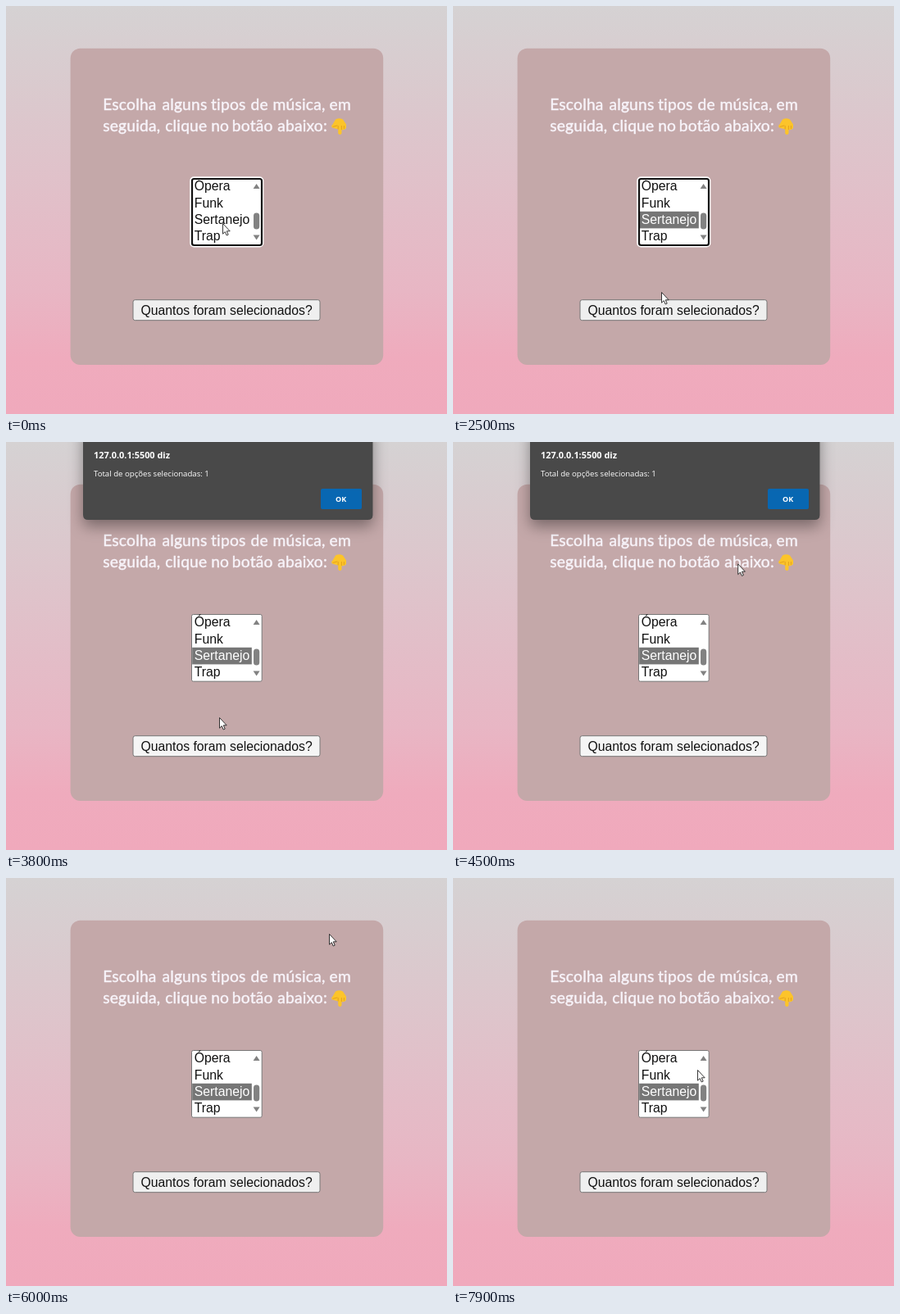
These frames come from a looping animation (538x498 px, 8000 ms). An HTML page:

```html
<!DOCTYPE html>
<html lang="pt-BR">
<head>
<meta charset="utf-8">
<title>Tipos de música</title>
<style>
  html, body { margin: 0; width: 100%; height: 100%; overflow: hidden; }
  svg { display: block; width: 100vw; height: 100vh; }
  .heading { font: 19.2px "Comic Sans MS", Lato, sans-serif; letter-spacing: .22px; fill: #f8f4fa; stroke: #f8f4fa; stroke-width: .45px; }
  .form { font: 15.75px "Liberation Sans", Arial, sans-serif; fill: #111; }
  .alert { font: 9.65px "Open Sans", sans-serif; fill: #fff; }
  .alert .title { font-size: 10.9px; font-weight: 700; }
  .alert .ok { font-size: 9px; font-weight: 700; text-anchor: middle; }
</style>
</head>
<body>
<svg viewBox="0 0 538 498">
  <defs>
    <linearGradient id="sky" x2="0" y2="1">
      <stop offset="0" stop-color="#d5d2d3"/>
      <stop offset=".2" stop-color="#dacace"/>
      <stop offset=".7" stop-color="#e8b6c4"/>
      <stop offset=".86" stop-color="#efabbd"/>
      <stop offset="1" stop-color="#f0a9bc"/>
    </linearGradient>
    <filter id="shadow" x="-20%" y="-30%" width="140%" height="190%">
      <feDropShadow dx="0" dy="8" stdDeviation="9" flood-opacity=".38"/>
    </filter>
  </defs>
  <rect width="538" height="498" fill="url(#sky)"/>
  <rect x="78.6" y="51.8" width="381.6" height="386.2" rx="12" fill="#c4a8a9"/>

  <text class="heading" y="127"><tspan x="118.2">Escolha </tspan><tspan x="190.4">alguns </tspan><tspan x="250">tipos </tspan><tspan x="298.6">de </tspan><tspan x="325.6">música, </tspan><tspan x="394.6">em</tspan></text>
  <text class="heading" y="153"><tspan x="118.2">seguida, </tspan><tspan x="194.2">clique </tspan><tspan x="250.2">no </tspan><tspan x="275.8">botão </tspan><tspan x="331.2">abaixo:</tspan></text>

  <g stroke-linecap="round" fill="none">
    <path d="M402 138.5Q406.5 136 411 138.5L415 144.5V149Q412.5 152 409.5 151V155.5Q407.4 158.5 405.2 155.5V150.5L398 148.5Q396 146.5 398.5 144.5Z" fill="#fcc42a"/>
    <path d="M405.2 150V146.5M409.4 150.5V146.5M412.4 149.5V146.5M399 147.3L404 146" stroke="#dc981c" stroke-width=".8"/>
  </g>

  <g class="form">
    <rect x="226.5" y="210.5" width="85.7" height="81.7" rx="2" fill="#fff" stroke="#767676"/>
    <rect id="pick" x="227.2" y="250.8" width="72.6" height="20.6" fill="#767676"/>
    <g id="rows"/>
    <rect x="302" y="252.6" width="7.2" height="20" rx="3.6" fill="#828282"/>
    <path d="M301.6 223L305.6 217L309.6 223ZM301.6 279.5H309.6L305.6 285.5Z" fill="#828282"/>
    <g id="ring" fill="none" stroke-width="2">
      <rect x="225.2" y="209.2" width="88.2" height="84.3" rx="4" stroke="#fff"/>
      <rect x="227" y="211" width="85" height="81" rx="2.5" stroke="#111" stroke-width="2.2"/>
    </g>
  </g>

  <g class="form">
    <rect id="button" x="155" y="358.7" width="228" height="25" rx="2.5" stroke="#767676"/>
    <text x="164.5" y="377">Quantos foram selecionados?</text>
  </g>

  <g id="alert" class="alert">
    <path d="M94 -20H447.5V89Q447.5 95 441.5 95H100Q94 95 94 89Z" fill="#4a4a4a" filter="url(#shadow)"/>
    <text class="title" x="107" y="20">127.0.0.1:5500 diz</text>
    <text x="107" y="41.7">Total de opções selecionadas: 1</text>
    <rect id="ok" x="384" y="57" width="50" height="25" rx="2"/>
    <text class="ok" x="408.6" y="72.8">OK</text>
  </g>

  <path id="cursor" d="M.5 .5V13.2L3.3 10.6L5.2 15L7.2 14.1L5.3 9.8H9.2Z" fill="#fff" stroke="#222" stroke-width=".9" stroke-linejoin="round"/>
</svg>
<script>
const LOOP = 8000, STEP = 100;
const $ = id => document.getElementById(id);
const set = (id, name, value) => $(id).setAttribute(name, value);
const show = (id, on) => set(id, 'visibility', on ? 'visible' : 'hidden');

// Pointer path: time, x, y
const path = [
  [0, 264, 265], [500, 264, 265], [800, 258, 263],
  [1100, 258, 263], [1500, 244, 263], [1800, 244, 263], [1900, 244, 264],
  [2000, 244, 264], [2600, 256, 366], [2900, 258, 373],
  [3300, 258, 373], [3800, 260, 336], [4200, 289, 254], [4700, 386, 78], [4900, 394, 68],
  [6000, 394, 68], [6800, 352, 142], [7700, 302, 221], [7900, 298, 234], [8000, 298, 234]
];

function pointer(t) {
  const i = path.findIndex(p => p[0] > t);
  const [t0, x0, y0] = path[i - 1], [t1, x1, y1] = path[i];
  const k = (t - t0) / (t1 - t0);
  return [x0 + (x1 - x0) * k, y0 + (y1 - y0) * k];
}

const rows = ['Ópera', 'Funk', 'Sertanejo', 'Trap'].map((name, i) => {
  const row = document.createElementNS('http://www.w3.org/2000/svg', 'text');
  row.setAttribute('x', 229.8);
  row.setAttribute('y', 225.4 + i * 20.25);
  row.textContent = name;
  return $('rows').appendChild(row);
});

function draw(time) {
  const t = Math.floor(time % LOOP / STEP) * STEP;
  const [x, y] = pointer(t);
  const picked = t >= 100, focused = t < 2900;
  const pressed = t >= 2900 && t < 6000;
  const hover = focused && y > 359;
  const open = t >= 3100 && t < 6000;

  set('cursor', 'transform', `translate(${x} ${y})`);
  show('ring', focused);
  show('pick', picked);
  rows[2].style.fill = picked ? '#fff' : '';
  set('button', 'fill', pressed ? '#f5f5f5' : hover ? '#e5e5e5' : '#efefef');

  show('alert', open);
  set('alert', 'opacity', t < 3200 ? .6 : 1);
  const over = x >= 384 && y >= 57 && y <= 82;
  set('ok', 'fill', t >= 5300 ? '#3a8ac6' : t >= 5200 ? '#2c80c0' : over ? '#1f76bb' : '#0867b2');
}

function tick() {
  draw(performance.now());
  requestAnimationFrame(tick);
}
tick();
</script>
</body>
</html>
```
